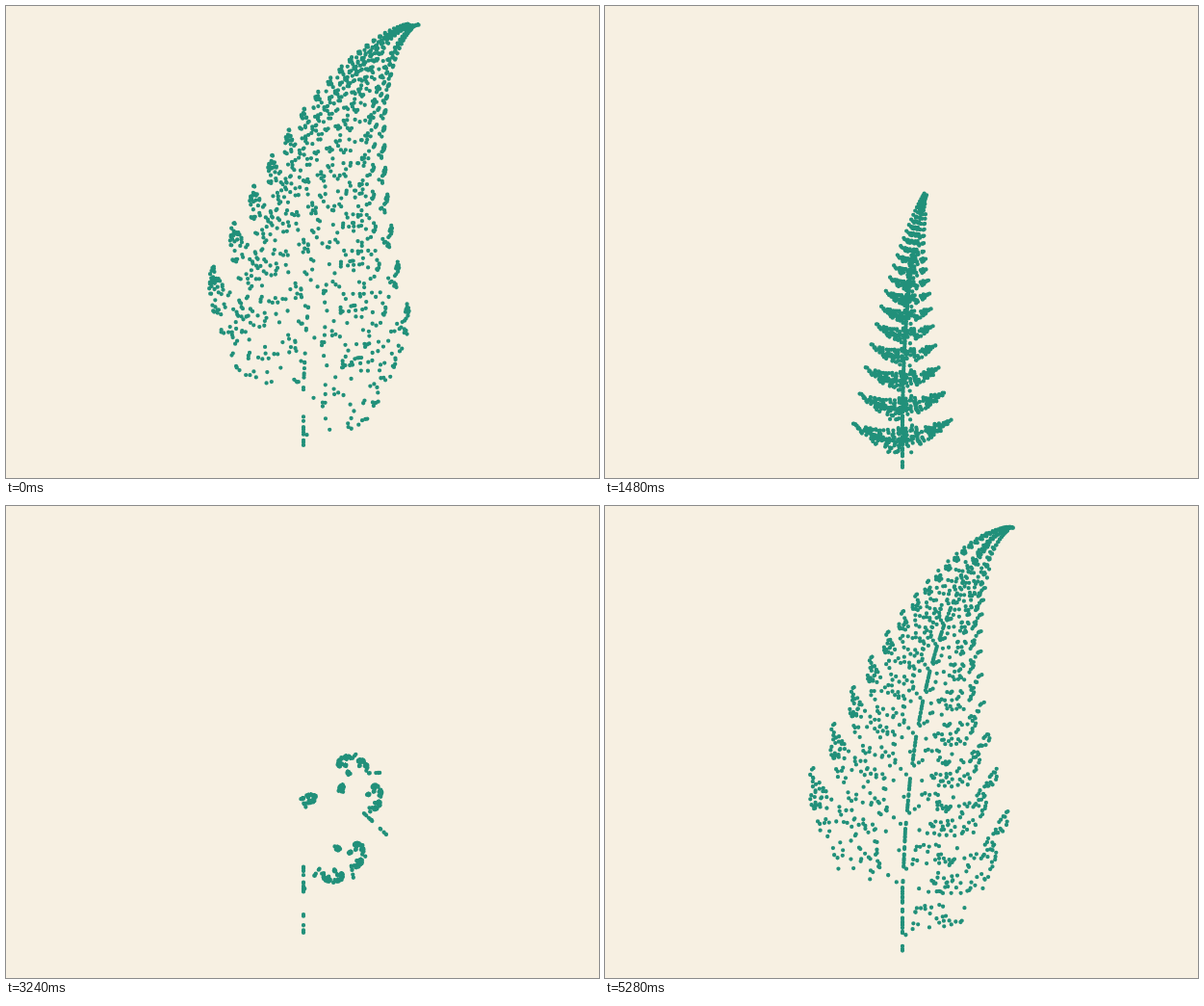
An HTML page with a canvas for the animation above (5320 ms loop, 616 px wide and 490 px high).

```html
<!DOCTYPE html>
<html lang="en">
<head>
<meta charset="utf-8">
<title>Morphing fern</title>
<style>
  html, body { margin: 0; width: 100%; height: 100%; overflow: hidden; background: #f7f0e2; }
  canvas { display: block; }
</style>
</head>
<body>
<canvas id="stage" width="616" height="490"></canvas>
<script>
const LOOP = 5320, STEP = 40, POINTS = 1400, WARMUP = 20;
const SCALE = 45, ORIGIN_X = 309, ORIGIN_Y = 468, RADIUS = 2.15;
const ctx = document.getElementById('stage').getContext('2d');

// Affine maps, each a rule with an odds weight and a place.
const map = (odds, a, b, c, d, x, y) => ({ odds, a, b, c, d, x, y });

function turn(odds, scale, degrees, x, y) {
  const angle = degrees * Math.PI / 180;
  const cos = scale * Math.cos(angle), sin = scale * Math.sin(angle);
  return map(odds, cos, -sin, sin, cos, x, y);
}

const squash = (odds, width, height, y) => map(odds, width, 0, 0, height, 0, y);

// A leaflet lays the whole plant on its side; side is -1 for left, 1 for right.
const leaf = (side, { reach, thick, lean, rise, y }) =>
  map(.07, -side * lean, side * reach, thick, rise, 0, y);

// Plants whose two leaflets mirror each other, one slightly higher.
function plant(stem, main, blade, gap) {
  return [stem, main, leaf(-1, blade), leaf(1, { ...blade, y: blade.y + gap })];
}

const fern = [
  squash(.012, 0, .16, 0),
  turn(.85, .851, -2.7, 0, 1.6),
  leaf(-1, { reach: .26, thick: .23, lean: .2, rise: .22, y: 1.6 }),
  leaf(1, { reach: .28, thick: .26, lean: .15, rise: .24, y: .44 })
];

const smallFern = plant(
  squash(.02, 0, .25, -.14),
  turn(.84, .83, -1.5, 0, 1),
  { reach: .28, thick: .3, lean: .09, rise: .1, y: .6 }, .1);

const fishbone = plant(
  squash(.02, 0, .25, -.47),
  turn(.84, .953, -.04, 0, .43),
  { reach: .063, thick: .265, lean: .02, rise: -.015, y: -.15 }, .04);

const curl = [
  squash(.04, 0, .29, -.36),
  turn(.55, .636, 28, 0, 3.37),
  turn(.31, .39, -40, 0, 1.7),
  turn(.1, .09, 45, .14, 1.93)
];

const clusters = [
  squash(.002, 0, .8, -.4),
  turn(.4, .42, 78, 4.42, 1.82),
  turn(.38, .4, -33, -.24, 1.03),
  squash(.22, .32, .06, 5.04)
];

const petals = [
  squash(.015, 0, 1.2, -.7),
  turn(.43, .54, 97, 2.37, 2.74),
  turn(.22, .41, 172, 2.27, 2.82),
  turn(.335, .5, 164, 3.55, 3.67)
];

const linear = s => s;
const settle = s => 1 - (1 - s) ** 2;

const timeline = [
  { at: 0, shape: fern },
  { at: 960, shape: smallFern, ease: linear },
  { at: 2240, shape: fishbone, ease: linear },
  { at: 2800, shape: curl, ease: linear },
  { at: 3720, shape: clusters, ease: linear },
  { at: 4480, shape: petals, ease: linear },
  { at: LOOP, shape: fern, ease: settle }
];

function blend(from, to, s) {
  const mixed = {};
  for (const key in from) mixed[key] = from[key] + (to[key] - from[key]) * s;
  return mixed;
}

function shapeAt(time) {
  const next = timeline.findIndex(key => key.at > time);
  const from = timeline[next - 1], to = timeline[next];
  const s = to.ease((time - from.at) / (to.at - from.at));
  return from.shape.map((m, i) => blend(m, to.shape[i], s));
}

function randomFrom(seed) {
  return () => {
    seed = (seed + 0x6d2b79f5) | 0;
    let n = Math.imul(seed ^ (seed >>> 15), 1 | seed);
    n = (n + Math.imul(n ^ (n >>> 7), 61 | n)) ^ n;
    return ((n ^ (n >>> 14)) >>> 0) / 4294967296;
  };
}

function pick(maps, r) {
  r *= maps.reduce((sum, m) => sum + m.odds, 0);
  return maps.find(m => (r -= m.odds) < 0) || maps[1];
}

function draw(frame) {
  const maps = shapeAt(frame * STEP);
  const random = randomFrom(frame * 7919 + 17);
  ctx.fillStyle = '#f7f0e2';
  ctx.fillRect(0, 0, 616, 490);
  ctx.fillStyle = '#21907a';
  ctx.beginPath();
  let x = 0, y = 1;
  for (let i = -WARMUP; i < POINTS; i++) {
    const m = pick(maps, random());
    [x, y] = [m.a * x + m.b * y + m.x, m.c * x + m.d * y + m.y];
    if (i < 0) continue;
    const px = ORIGIN_X + x * SCALE, py = ORIGIN_Y - y * SCALE;
    ctx.moveTo(px + RADIUS, py);
    ctx.arc(px, py, RADIUS, 0, Math.PI * 2);
  }
  ctx.fill();
}

const start = performance.now();
let shown = -1;
function tick() {
  const frame = Math.floor(((performance.now() - start) % LOOP) / STEP);
  if (frame !== shown) draw(shown = frame);
  requestAnimationFrame(tick);
}
tick();
</script>
</body>
</html>
```
